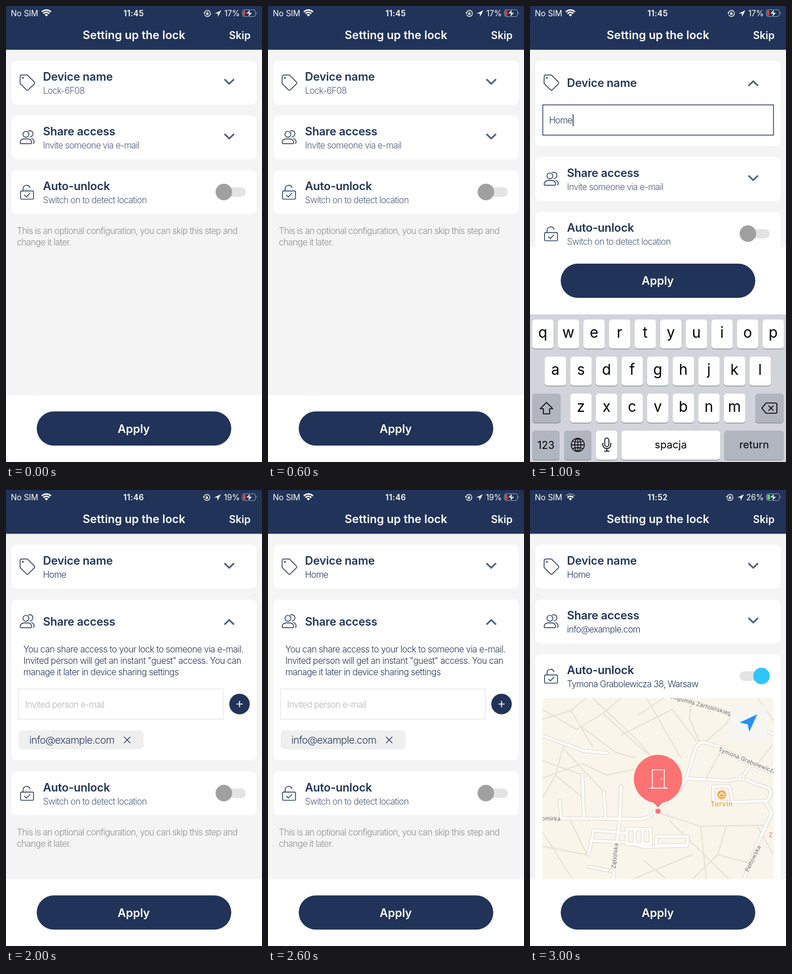
Recreate the animation shown at these times as an HTML page. Size 450 by 800 pixels, loop 4 s.

```html
<!DOCTYPE html>
<html lang="en">
<head>
<meta charset="utf-8">
<title>Lock setup</title>
<style>
html, body { margin: 0; width: 100%; height: 100%; overflow: hidden; background: #f4f4f4; }
svg { display: block; width: 100%; height: 100%; font-family: Inter, Roboto, sans-serif; font-optical-sizing: none; }
.title { font-size: 20px; font-weight: 600; letter-spacing: -.22px; fill: #213358; }
.head { font-size: 20px; font-weight: 600; fill: #fff; }
.skip { font-size: 18px; font-weight: 600; fill: #fff; }
.sub { font-size: 15.5px; font-weight: 300; letter-spacing: -.62px; fill: #4d5b7b; }
.dark { fill: #253659; }
.note { letter-spacing: -.5px; }
.hint { fill: #8f8f8f; }
.faint { fill: #b4b4b4; }
.chip { font-size: 17.8px; font-weight: 300; letter-spacing: -.6px; fill: #253659; }
.bar { font-size: 14px; fill: #fff; }
.key { font-size: 26px; fill: #000; }
.word { font-size: 18.3px; fill: #000; }
.street { font-size: 10px; letter-spacing: .2px; fill: #6f6c70; stroke: #f9f6ed; stroke-width: 2px; paint-order: stroke; }
.line { fill: none; stroke: #253659; stroke-width: 1.4; stroke-linecap: round; stroke-linejoin: round; }
.chev { fill: none; stroke: #4d5d83; stroke-width: 3; }
</style>
</head>
<body>
<svg id="stage" viewBox="0 0 450 800" preserveAspectRatio="none"></svg>
<script>
const NAVY = '#213358';

const rect = (x, y, w, h, fill, r = 0, more = '') =>
  `<rect x="${x}" y="${y}" width="${w}" height="${h}" rx="${r}" fill="${fill}" ${more}/>`;
const circle = (x, y, r, fill, more = '') =>
  `<circle cx="${x}" cy="${y}" r="${r}" fill="${fill}" ${more}/>`;
const text = (x, y, s, cls, anchor = 'start', more = '') =>
  `<text x="${x}" y="${y}" class="${cls}" text-anchor="${anchor}" ${more}>${s}</text>`;
const path = (d, more = 'class="line"') => `<path d="${d}" ${more}/>`;
const at = (x, y, body) => `<g transform="translate(${x} ${y})">${body}</g>`;

// Icons are centred on 0,0
const icons = {
  tag: path('M-12-11.5q0-1.6 1.6-1.7L-1-13.6q1.6 0 2.6 1L13-.9q1.3 1.4 0 2.8L2 12.8q-1.4 1.3-2.8 0L-11.4 2.2q-1-1-1-2.5z')
    + circle(-7.3, -8.3, 1.4, NAVY),
  people: path('M-7.2-5.4a5.2 5.2 0 1 0 10.4 0a5.2 5.2 0 1 0-10.4 0zM-12 9.8q0-7 6.5-7h7q6.5 0 6.5 7q0 1.2-1.2 1.2h-17.6q-1.2 0-1.2-1.2z')
    + path('M2.4-11.2a5.5 5.5 0 1 1 2.8 10.4M7.8 2.2q4.6 1.3 4.6 6.4q0 1.8-1.6 1.8'),
  lock: path('M-9.8-2h19.6q1.6 0 1.6 1.6v11.2q0 1.6-1.6 1.6h-19.6q-1.6 0-1.6-1.6V-.4q0-1.6 1.6-1.6zM-7-2v-4.2a6.3 6.3 0 0 1 12.2-1.6M-4.6 5.2l3.3 3.2 6.2-6.1')
};

const chevron = (y, up) => path(`M384 ${up ? y + 4 : y - 4}l8.4 ${up ? -8 : 8} 8.4 ${up ? 8 : -8}`, 'class="chev"');

function toggle(y, on) {
  return rect(368.5, y - 8, 53, 16.5, '#e3e3e4', 8)
    + circle(on ? 407 : 383, y, 14.5, on ? '#30c5ff' : '#a0a0a0');
}

function card(y, h, icon, title, sub, dark) {
  return rect(9.5, y, 431, h, '#fff', 9)
    + at(37, y + 38.5, icons[icon])
    + text(65, y + (sub ? 35 : 46), title, 'title')
    + (sub ? text(65, y + 58, sub, dark ? 'sub dark' : 'sub') : '');
}

const device = sub => card(96, 77, 'tag', 'Device name', sub, sub === 'Home') + chevron(132.5);
const share = (y, sub, dark) => card(y, 77, 'people', 'Share access', sub, dark) + chevron(y + 36.5);
const auto = y => card(y, 77, 'lock', 'Auto-unlock', 'Switch on to detect location') + toggle(y + 38.2);
const hint = y => text(19, y, 'This is an optional configuration, you can skip this step and', 'sub hint')
  + text(19, y + 20, 'change it later.', 'sub hint');

function footer(y) {
  return rect(0, y, 450, 118, '#fff') + rect(54, y + 28.6, 342, 60, NAVY, 30)
    + text(224.5, y + 66, 'Apply', 'head', 'middle');
}

function wifi(weak) {
  const arc = (r, op) => {
    const k = r * .72;
    return path(`M${-k} ${-k}A${r} ${r} 0 0 1 ${k} ${-k}`, `fill="none" stroke="#fff" stroke-width="2.5" opacity="${op}"`);
  };
  return at(71, 18.5, arc(11.2, weak ? .35 : 1) + arc(7.2, 1) + path('M0 0L-3-3.2Q0-5.6 3-3.2z', 'fill="#fff"'));
}

function header(time, charge, weak) {
  const shift = charge > 25 ? -2.5 : charge > 17 ? -1 : 0;
  const level = charge > 20 ? '#4cd964' : '#ff4038';
  return rect(0, 0, 450, 76.8, NAVY)
    + text(8.5, 17.5, 'No SIM', 'bar') + wifi(weak)
    + text(224.5, 17.5, time, 'bar', 'middle', 'font-weight="600" letter-spacing=".35"')
    + at(354 + shift, 13,
      path('M-4.8-2.3A5.3 5.3 0 1 1-4.8 2.3', 'fill="none" stroke="#fff" stroke-width="1.3"')
      + path('M-7-1.8h4l-2 3z', 'fill="#fff"')
      + rect(-2, -.7, 4, 3.2, '#fff', .5)
      + path('M-1.2-.5v-1a1.2 1.2 0 0 1 2.4 0v1', 'fill="none" stroke="#fff" stroke-width=".8"'))
    + at(373 + shift, 13, path('M5.5-5.5L-6 .2H-.4V6z', 'fill="#fff"'))
    + text(411, 17.5, charge + '%', 'bar', 'end')
    + rect(415.5, 6.5, 23, 12, 'none', 3.5, 'stroke="#959eb0"')
    + path('M440 10.5q2 2 0 4z', 'fill="#959eb0"')
    + rect(417, 8, 20 * charge / 100, 9, level, 1.5)
    + path('M430 5l-8 8.5h5l-2 6.5 8-8.5h-5z', `fill="#fff" stroke="${NAVY}" stroke-width=".8"`)
    + text(225, 57.5, 'Setting up the lock', 'head', 'middle')
    + text(430, 57.5, 'Skip', 'skip', 'end');
}

function keyboard() {
  const cap = (x, y, w, gray) => rect(x, y + 1.2, w, 51, '#8b8d92', 5) + rect(x, y, w, 51, gray ? '#b0b5c0' : '#fff', 5);
  const ink = 'fill="none" stroke="#000" stroke-width="1.6" stroke-linejoin="round" stroke-linecap="round"';
  const rows = [['qwertyuiop', 4, 550], ['asdfghjkl', 26, 615], ['zxcvbnm', 71, 680]];
  let out = rect(0, 541, 450, 259, '#d2d4db');
  for (const [letters, x, y] of rows) {
    [...letters].forEach((c, i) => {
      out += cap(x + 45 * i, y, 37.5) + text(x + 45 * i + 18.5, y + 32.3, c, 'key', 'middle');
    });
  }
  out += cap(4, 680, 50, 1) + cap(396, 680, 50, 1) + cap(4, 745, 48, 1) + cap(60, 745, 48, 1)
    + cap(116, 745, 37.5) + cap(161, 745, 173) + cap(341.5, 745, 104.5, 1);
  out += at(29, 706, path('M0-10.5L11 .5H5.5V9.5h-11V.5H-11z', ink));
  out += at(421, 705.5, path('M-6-9H10.5q2.5 0 2.5 2.5v13q0 2.5-2.5 2.5H-6L-13.5 0zM-1.5-4l8 8m0-8l-8 8', ink));
  out += at(84, 770, circle(0, 0, 11.5, 'none', 'stroke="#000" stroke-width="1.4"')
    + '<ellipse rx="5.5" ry="11.5" fill="none" stroke="#000" stroke-width="1.3"/>'
    + path('M0-11.5v23M-11.5 0h23M-9-6.5Q0-3 9-6.5M-9 6.5Q0 3 9 6.5', 'fill="none" stroke="#000" stroke-width="1.3"'));
  out += at(135, 769, rect(-3.6, -11, 7.2, 15, 'none', 3.6, 'stroke="#000" stroke-width="1.5"')
    + path('M-7-2v2.5a7 7 0 0 0 14 0V-2M0 7.5V12M-4 12H4', ink));
  return out + text(28, 776.5, '123', 'word', 'middle') + text(247.5, 776, 'spacja', 'word', 'middle')
    + text(394, 776, 'return', 'word', 'middle');
}

function map() {
  const lanes = [
    'M22 402L72 387 98 365M72 387L110 450M22 385L82 420 128 392 160 365M110 365L190 440 240 500',
    'M90 415L150 460 185 470M128 392L205 462M190 395L235 365M160 430L250 385 292 440M205 365L265 470',
    'M22 505L92 480 135 500 183 490M60 445L45 500 22 540M45 500L92 540M22 475L92 500M60 455L130 530',
    'M298 443L280 400 285 365M310 440L345 410 352 398M340 450L310 505M400 365L428 405M428 445L400 480',
    'M225 566L300 590 420 588M245 580L350 683M285 683L330 640 345 590M300 590L310 683M330 640L390 655',
    'M22 625L100 640M22 600L75 683M200 650L240 683M180 683L285 640M400 590L428 640M70 577L100 640'
  ];
  const roads = [
    'M22 431L60 445 95 458 135 461M22 576L183 577Q203 578 212 571L262 525Q270 517 275 506L291 454Q296 441 308 443L340 453 372 474 428 497',
    'M248 362L330 385 360 398 428 428M275 506L350 510 372 505 390 480M372 505L400 517 418 522Q428 528 417 545L357 548 350 520H322V546L357 548',
    'M412 545L425 566 398 625 376 683M92 500L95 576M130 530L133 577M160 520L158 577 150 640 146 683M52 545L55 576',
    'M103 640L112 597 168 602M106 615L165 618 200 626 276 624M170 595H212V621H170zM184 595V621M198 595V621M222 608H277V623H222zM103 661L146 669'
  ];
  const join = 'fill="none" stroke-linejoin="round" stroke-linecap="round"';
  const draw = (d, color, w) => path(d, `${join} stroke="${color}" stroke-width="${w}"`);
  const label = (x, y, turn, s) => at(x, y, `<g transform="rotate(${turn})">${text(0, 0, s, 'street', 'middle')}</g>`);
  const d = roads.join('');
  return '<clipPath id="area"><rect x="22" y="365" width="406" height="340" rx="8"/></clipPath><g clip-path="url(#area)">'
    + rect(22, 365, 406, 320, '#f9f5eb')
    + draw(lanes.join(''), '#e7e1d3', 2)
    + draw(d, '#ded9ce', 6.5) + draw(d, '#fff', 4.3)
    + circle(372, 505, 6, '#fff', 'stroke="#ded9ce"') + circle(372, 505, 2, '#e7e1d3')
    + label(302, 381, 16, 'Bogumiła Zartolińskiego') + label(381, 478, 22, 'Tymona Grabolewicza')
    + label(37, 580, 1, 'omirka') + label(152.5, 642, -84, 'Zębolska') + label(395, 648, -64, 'Pełtowska')
    + text(420, 609, 'Z', 'street', 'start', 'style="fill:#df6657"')
    + circle(337, 534.5, 8.3, '#eca73f', 'stroke="#fff"')
    + path('M332.5 533.5h9l-1.3 5h-6.4zM334.5 533a2.5 3 0 0 1 5 0', 'fill="none" stroke="#fff" stroke-width="1.2"')
    + text(337, 555, 'Torvin', 'street', 'middle', 'style="font-size:11.5px;font-weight:500;letter-spacing:.8px;fill:#e39a36"')
    + rect(352, 377, 64, 64, '#f7f6f3', 9, 'opacity=".95"')
    + path('M399.5 393.5L368.5 408 382.5 411 385.5 424z', 'fill="#2491f5"')
    + '</g>'
    + path('M216 547L225 557 234 547z', 'fill="#fd7272"')
    + circle(225, 507, 42.5, '#fd7272') + circle(225, 563.5, 4.6, '#fd7272')
    + path('M215 523V490.7H236V523M209 523H242', 'fill="none" stroke="#fff" stroke-width="1.5"')
    + circle(231.5, 507, 1.3, '#fff');
}

const mail = 'info@example.com';

function nameForm() {
  return card(96, 150, 'tag', 'Device name') + chevron(136, true)
    + rect(22.5, 173.5, 405.5, 53, '#fff', 0, `stroke="${NAVY}" stroke-width="1.3"`)
    + text(33.5, 206, 'Home', 'sub dark') + rect(74.8, 190, 1.8, 21, '#3e527d');
}

function shareForm() {
  const lines = [
    'You can share access to your lock to someone via e-mail.',
    'Invited person will get an instant "guest" access. You can',
    'manage it later in device sharing settings'
  ];
  return card(192, 282.5, 'people', 'Share access') + chevron(232, true)
    + lines.map((s, i) => text(30.5, 285 + 20 * i, s, 'sub dark note')).join('')
    + rect(22, 349, 360, 53, '#fff', 0, 'stroke="#e4e4e4" stroke-width="1.2"')
    + text(33.5, 382, 'Invited person e-mail', 'sub faint')
    + circle(410.5, 375.5, 18, NAVY) + path('M405 375.5h11M410.5 370v11', 'stroke="#fff" stroke-width="1.6"')
    + rect(22, 421.5, 220, 33.5, '#efeff0', 8) + text(41, 445, mail, 'chip')
    + path('M207.5 433l11 11m0-11l-11 11', 'fill="none" stroke="#253659" stroke-width="1.2"');
}

const scenes = [
  header('11:45', 17) + device('Lock-6F08') + share(192, 'Invite someone via e-mail') + auto(288) + hint(400) + footer(682.6),
  header('11:45', 17) + nameForm() + share(265, 'Invite someone via e-mail') + auto(361) + footer(423.4) + keyboard(),
  header('11:46', 19) + device('Home') + shareForm() + auto(493.5) + hint(606) + footer(682.6),
  header('11:52', 26, true) + device('Home') + share(192, mail, true)
    + card(288, 420, 'lock', 'Auto-unlock', 'Tymona Grabolewicza 38, Warsaw', true) + toggle(326.2, true) + map() + footer(682.6)
];

const stage = document.getElementById('stage');
stage.innerHTML = rect(0, 0, 450, 800, '#f4f4f4') + scenes.map(s => `<g class="scene">${s}</g>`).join('');
const groups = [...stage.querySelectorAll('.scene')];
const HOLD = 1000;

function show() {
  const now = Math.floor(performance.now() / HOLD) % groups.length;
  groups.forEach((g, i) => { g.style.display = i === now ? '' : 'none'; });
  requestAnimationFrame(show);
}
show();
</script>
</body>
</html>
```
